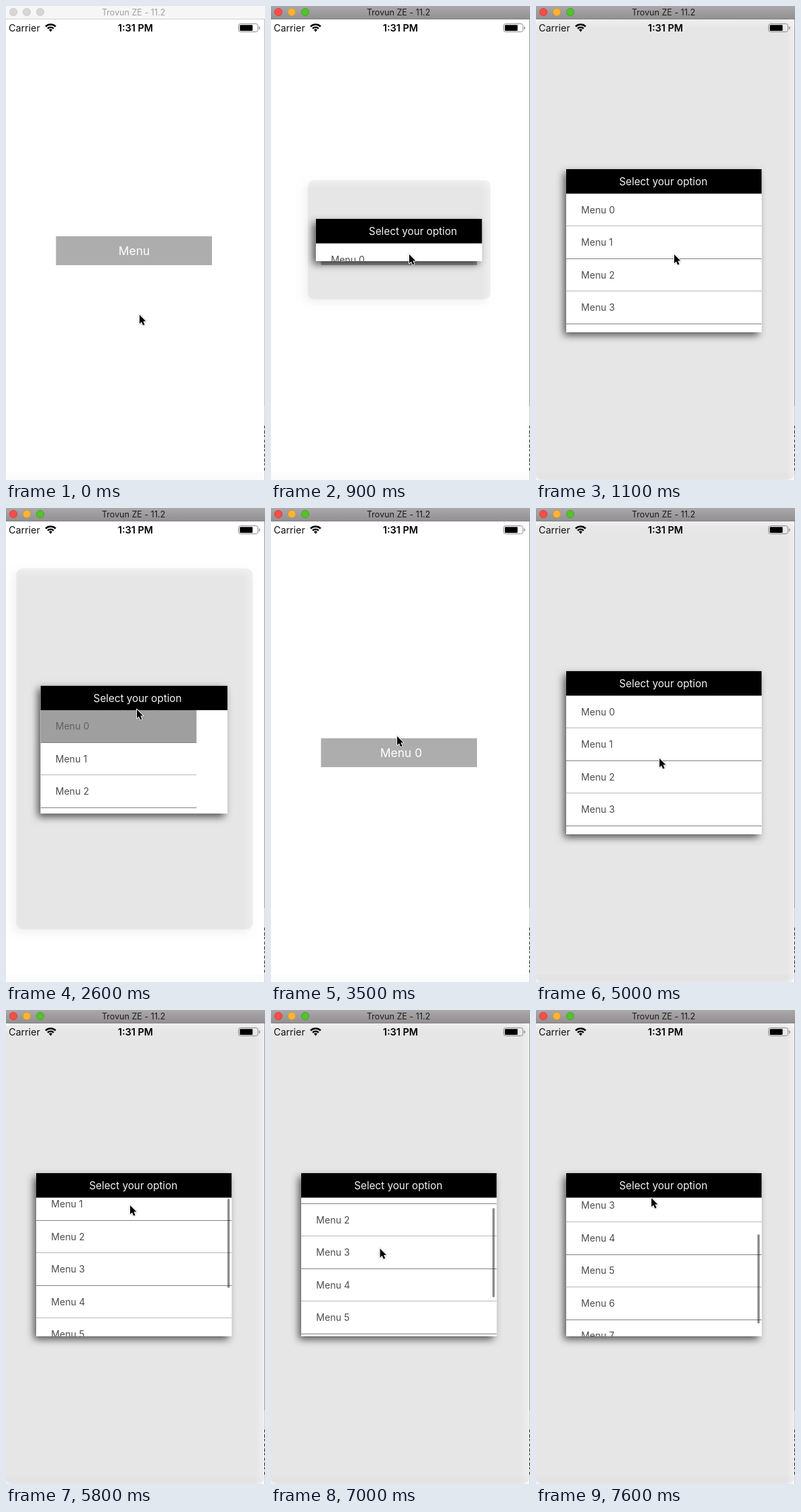
An HTML page with a canvas that plays this animation: 386x706 px, repeating every 8 s.

```html
<!DOCTYPE html>
<html lang="en">
<head>
<meta charset="utf-8">
<title>Dropdown menu</title>
<style>
  html, body { margin: 0; width: 100%; height: 100%; overflow: hidden; background: #fff; }
  canvas { display: block; }
</style>
</head>
<body>
<canvas id="stage" width="386" height="706"></canvas>
<script>
const ctx = document.getElementById('stage').getContext('2d');
const LOOP = 8000, TICK = 100;
const ROW = 48.5, HEADER = 36.2, ROW_COUNT = 8;
const BUTTON = { left: 74.5, top: 343, right: 307, bottom: 386 };
const FOLDED = [74.5, 343, 307, 343];
const POPUP = [45, 243, 336.5, 486];
const OVERLAY = [-1, 20, 385, 706];

// Keyframes: time followed by values
const CURSOR = [
  [0, 199, 460], [500, 206, 370], [1800, 206, 370], [2100, 195, 300],
  [3400, 195, 300], [3500, 188, 340], [3700, 184, 373], [5500, 184, 373],
  [5800, 185, 291], [6100, 184, 287], [6300, 184, 287], [6800, 161, 368],
  [6900, 161, 368], [7600, 172, 280], [LOOP, 172, 280]
];
const SCROLL = [
  [0, 0], [5500, 0], [5800, 63], [6100, 71], [6900, 71],
  [7200, 122], [7400, 149], [7600, 157.6], [LOOP, 157.6]
];
const THUMB_ALPHA = [
  [0, 0], [5500, 0], [5600, 1], [6300, 1], [6700, 0], [6900, 0], [7000, 1], [LOOP, 1]
];

const clamp = x => Math.min(1, Math.max(0, x));
const lerp = (a, b, k) => a + (b - a) * k;
const ease = x => { x = clamp(x); return x * x * (3 - 2 * x); };

function track(keys, t) {
  const i = Math.max(1, keys.findIndex(key => key[0] > t));
  const a = keys[i - 1], b = keys[i];
  const k = (t - a[0]) / (b[0] - a[0]);
  return a.slice(1).map((v, j) => lerp(v, b[j + 1], k));
}

function openness(t) {
  if (t < 2500) return ease((t - 800) / 300);
  if (t < 3900) return 1 - ease((t - 2510) / 300);
  return ease((t - 3950) / 300);
}

function unfold(target, p) {
  const [left, top, right, bottom] = target.map((v, i) => lerp(FOLDED[i], v, p));
  return { left, top, width: right - left, height: bottom - top };
}

function rect(x, y, w, h, color) {
  ctx.fillStyle = color;
  ctx.fillRect(x, y, w, h);
}

function rounded(x, y, w, h, r) {
  ctx.beginPath();
  ctx.roundRect(x, y, w, h, r);
}

// y is the middle of the capital letters
function text(str, x, y, size, color, align = 'left', weight = 400) {
  ctx.font = `${weight} ${size}px Inter, sans-serif`;
  ctx.textAlign = align;
  ctx.fillStyle = color;
  ctx.fillText(str, x, y + size * 0.36);
}

function shadow(color, offset, blur) {
  ctx.shadowColor = color;
  ctx.shadowOffsetX = -offset;
  ctx.shadowOffsetY = offset;
  ctx.shadowBlur = blur;
}

function drawTitleBar(active) {
  const fill = ctx.createLinearGradient(0, 0, 0, 20);
  fill.addColorStop(0, active ? '#aaa8aa' : '#f6f6f6');
  fill.addColorStop(1, active ? '#918f91' : '#f6f6f6');
  rect(0, 0, 386, 20, fill);
  rect(0, 19, 386, 1, active ? '#858385' : '#d0d0d0');
  const lights = active
    ? [['#f94d48', '#d33a36'], ['#fdb433', '#d8932a'], ['#53c22b', '#3fa01f']]
    : Array(3).fill(['#d6d6d6', '#c4c4c4']);
  lights.forEach(([color, edge], i) => {
    ctx.beginPath();
    ctx.arc(11 + 20 * i, 9, 5.6, 0, 7);
    ctx.fillStyle = color;
    ctx.fill();
    ctx.lineWidth = 0.8;
    ctx.strokeStyle = edge;
    ctx.stroke();
  });
  text('Trovun ZE - 11.2', 190, 9.5, 12.6, active ? '#1c1c1c' : '#a0a0a0', 'center');
}

function drawStatusBar() {
  text('Carrier', 4, 32.5, 14.3, '#111');
  text('1:31 PM', 193, 32.5, 14.5, '#000', 'center', 600);

  ctx.strokeStyle = ctx.fillStyle = '#000';
  ctx.lineWidth = 2.5;
  for (const r of [6.3, 10.6]) {
    ctx.beginPath();
    ctx.arc(66.5, 38, r, -Math.PI * 0.75, -Math.PI * 0.25);
    ctx.stroke();
  }
  ctx.beginPath();
  ctx.moveTo(66.5, 38.5);
  ctx.arc(66.5, 38, 3.6, -Math.PI * 0.75, -Math.PI * 0.25);
  ctx.fill();

  rounded(346.5, 26.5, 29, 12, 3);
  ctx.lineWidth = 1;
  ctx.strokeStyle = '#8a8a8a';
  ctx.stroke();
  rounded(348.5, 28.2, 19, 8.8, 1);
  ctx.fill();
  rounded(377, 30.5, 1.5, 4.5, 1);
  ctx.fillStyle = '#8a8a8a';
  ctx.fill();
}

function drawWindowEdge(active) {
  rect(385, 20, 1, 686, active ? '#9c9c9c' : '#bdbdbd');
  rect(385, 596, 1, 110, '#d0d0d0');
  for (let y = 625; y < 690; y += 7) rect(385, y, 1, 3 + y % 3, '#222');
}

function drawButton(label, x) {
  const { left, top, right, bottom } = BUTTON;
  rect(left, top, right - left, bottom - top, '#adadad');
  text(label, x, 365, 17.4, '#fff', 'center');
}

function drawOverlay(p) {
  const { left, top, width, height } = unfold(OVERLAY, p);
  ctx.save();
  shadow('#000', 5, 11);
  rounded(left, top, width, height, 10);
  ctx.fillStyle = 'rgba(0, 0, 0, 0.05)';
  ctx.fill();
  ctx.restore();
}

function drawPopup(p, scroll, thumbAlpha, closing) {
  const { left, top, width, height } = unfold(POPUP, p);
  ctx.save();
  shadow('rgba(0, 0, 0, 0.65)', 4.5, 11);
  rect(left, top, width, height, '#fff');
  ctx.restore();

  ctx.save();
  ctx.beginPath();
  ctx.rect(left, top, width, height);
  ctx.clip();
  const rowWidth = closing ? 232.5 : width;
  for (let i = 0; i < ROW_COUNT; i++) {
    const y = top + HEADER + ROW * i - scroll;
    const selected = closing && i === 0;
    if (selected) rect(left, y, rowWidth, ROW, '#9f9f9f');
    text('Menu ' + i, left + 22.3, y + ROW / 2, 14.1, selected ? '#616161' : '#4d4d4d');
    const line = y + ROW;
    rect(left, Math.floor(line), rowWidth, 1, line % 1 > 0.5 ? '#b8b8b8' : '#808080');
  }
  if (thumbAlpha > 0) {
    const thumbTop = 281 + 0.56 * Math.max(0, scroll - 63);
    rounded(330, thumbTop, 3.4, 133, 1.7);
    ctx.fillStyle = `rgba(0, 0, 0, ${0.45 * thumbAlpha})`;
    ctx.fill();
  }
  rect(left, top, width, HEADER + 0.3, '#000');
  text('Select your option', left + 79, top + 18.5, 15.3, '#f4f4f4');
  ctx.restore();
}

function drawCursor(x, y) {
  ctx.save();
  ctx.translate(x, y);
  const arrow = new Path2D('M0 0V13.2L3 10.4L5.2 15.4L7.6 14.4L5.4 9.5H9.4Z');
  ctx.lineJoin = 'round';
  ctx.lineWidth = 2;
  ctx.strokeStyle = '#fff';
  shadow('rgba(0, 0, 0, 0.35)', 0, 2);
  ctx.stroke(arrow);
  ctx.shadowColor = 'transparent';
  ctx.fillStyle = '#000';
  ctx.fill(arrow);
  ctx.restore();
}

function draw(t) {
  const active = t >= 800;
  const chosen = t >= 2600;
  const p = openness(t);

  rect(0, 0, 386, 706, '#fff');
  rect(0, 695, 386, 11, '#fcfcfc');
  drawButton(chosen ? 'Menu 0' : 'Menu', chosen ? 194 : 191);
  if (p > 0) drawOverlay(p);
  drawStatusBar();
  if (p > 0) drawPopup(p, track(SCROLL, t)[0], track(THUMB_ALPHA, t)[0], chosen && t < 3900);
  drawTitleBar(active);
  drawWindowEdge(active);
  drawCursor(...track(CURSOR, t));
}

const start = performance.now();
function frame() {
  const t = (performance.now() - start) % LOOP;
  draw(Math.floor(t / TICK) * TICK);
  requestAnimationFrame(frame);
}
frame();
</script>
</body>
</html>
```
